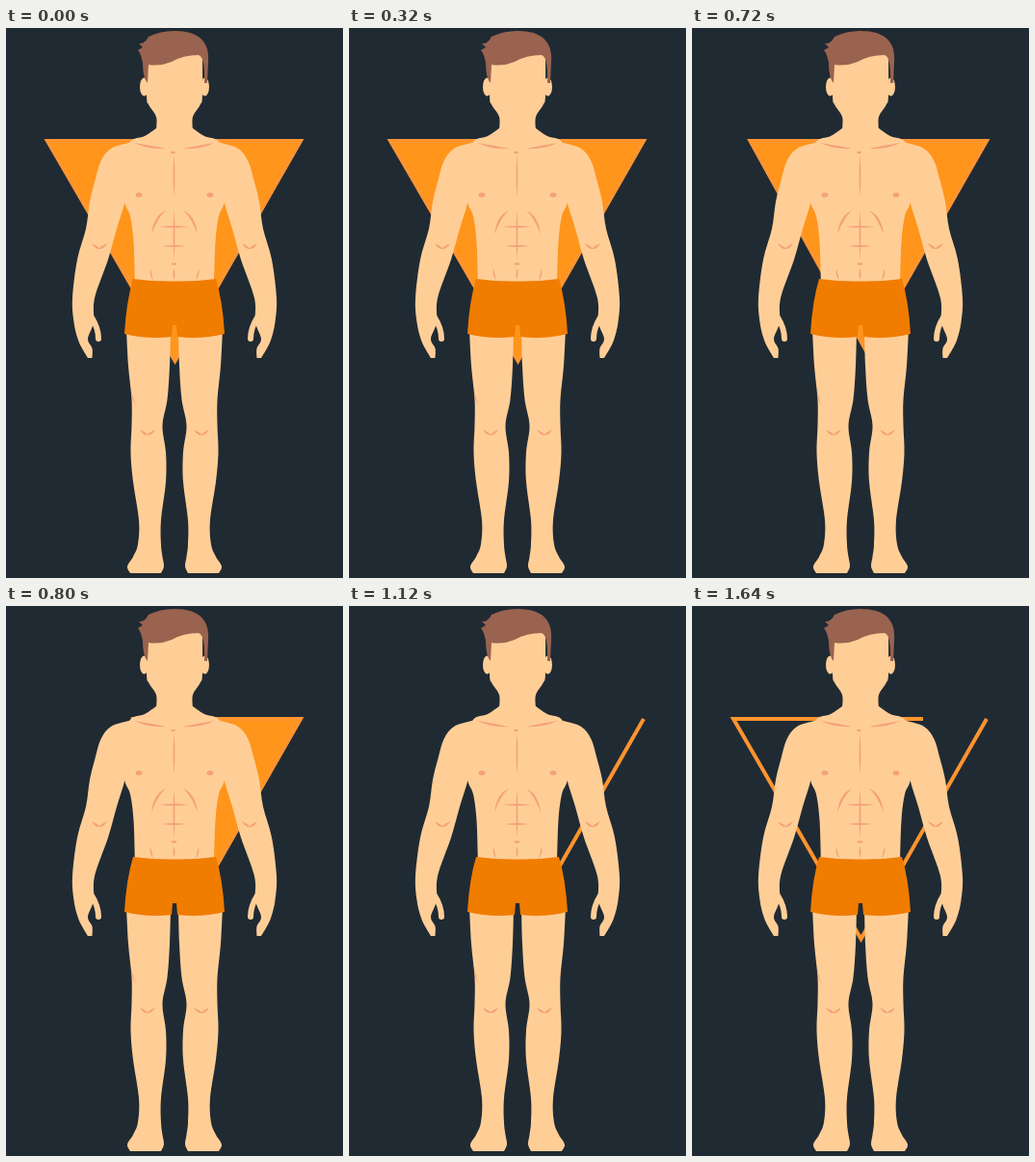
An HTML page with a canvas that plays this animation: 350x570 px, repeating every 1680 ms.

```html
<!DOCTYPE html>
<html lang="en">
<head>
<meta charset="utf-8">
<title>Body shape</title>
<style>
html, body { margin: 0; width: 100%; height: 100%; overflow: hidden; background: #202a33; }
canvas { display: block; width: 350px; height: 570px; }
</style>
</head>
<body>
<canvas id="stage" width="350" height="570"></canvas>
<script>
const ctx = document.getElementById('stage').getContext('2d');
const LOOP = 1680, STEP = 40;
const SHRINK_START = 600, SHRINK_TIME = 280;
const DRAW_START = 863, DRAW_SPEED = 0.931;
const MIDDLE = 175;
const COLORS = {
  back: '#202a33', skin: '#ffce97', crease: '#f4a277',
  hair: '#99634f', shorts: '#f07c00', fill: '#ff951a', line: '#ff942e'
};
const RIGHT = [306, 117], BOTTOM = [175.5, 345], LEFT = [43, 117];
const SHORTS = new Path2D('M176 262.5Q155 263 132 260Q125 283 123 317Q147 323 172 320L173 308H176Z');
const HAIR = new Path2D('M138 16Q144 17 148 9Q160 3 175 3C200 3 212 14 210 36L209 57H206' +
  'Q207 30 200 28Q184 28 172 35Q160 40 148 38L147 57Q142 52 142 36Q140 26 137 23L142 20Z');

const mix = (a, b, k) => a.map((v, i) => v + (b[i] - v) * k);
const distance = (a, b) => Math.hypot(b[0] - a[0], b[1] - a[1]);

function fillPath(path, color) {
  ctx.fillStyle = color;
  ctx.fill(path);
}

function curveThrough(points) {
  const at = i => points[Math.max(0, Math.min(points.length - 1, i))];
  ctx.lineTo(...points[0]);
  for (let i = 0; i < points.length - 1; i++) {
    const [a, b, c, d] = [at(i - 1), at(i), at(i + 1), at(i + 2)];
    ctx.bezierCurveTo(b[0] + (c[0] - a[0]) / 6, b[1] + (c[1] - a[1]) / 6,
      c[0] - (d[0] - b[0]) / 6, c[1] - (d[1] - b[1]) / 6, ...c);
  }
}

// Smooth vertical form: each row is [y, left edge, right edge].
function form(...rows) {
  ctx.beginPath();
  curveThrough(rows.map(([y, left]) => [left, y]));
  curveThrough(rows.map(([y, , right = MIDDLE + 1]) => [right, y]).reverse());
  ctx.fill();
}

function dot(x, y, rx, ry) {
  ctx.beginPath();
  ctx.ellipse(x, y, rx, ry, 0, 0, Math.PI * 2);
  ctx.fill();
}

// Thin mark, widest in the middle and pointed at both ends.
function crease(from, bend, to, width = 2.4) {
  const length = distance(from, to);
  const nx = (from[1] - to[1]) / length * width, ny = (to[0] - from[0]) / length * width;
  ctx.beginPath();
  ctx.moveTo(...from);
  ctx.quadraticCurveTo(bend[0] + nx, bend[1] + ny, ...to);
  ctx.quadraticCurveTo(bend[0] - nx, bend[1] - ny, ...from);
  ctx.fill();
}

const straight = (from, to) => crease(from, mix(from, to, 0.5), to, 1.9);

function joint(x, y) {
  crease([x - 8, y - 6], [x - 3, y - 1], [x + 1, y]);
  crease([x - 1, y], [x + 3, y - 1], [x + 8, y - 6]);
}

function drawHalf() {
  ctx.fillStyle = COLORS.skin;
  form([20, 146], [70, 146], [80, 148.5], [92, 156], [106, 156]);
  dot(143.5, 61, 4.5, 9.5);
  form([104, 156], [112, 144], [119, 128], [150, 120], [180, 123], [195, 129], [222, 132.5], [266, 134]);
  form([119, 127, 130], [125, 109, 130], [138, 98.5, 128], [158, 92.5, 126], [180, 87, 123.5],
    [208, 83, 115], [240, 74, 106], [280, 69, 92], [305, 70.5, 91], [322, 74.5, 85],
    [332, 79, 89.5], [342, 85, 89.5]);
  form([312, 125, 171], [350, 127, 170], [385, 130.5, 167.5], [412, 130.5, 162.5], [440, 129.5, 166],
    [470, 132, 166], [510, 138, 161], [535, 137, 161], [548, 132, 162.5], [558, 126, 164], [565, 129, 161]);

  ctx.strokeStyle = COLORS.skin;
  ctx.lineWidth = 6;
  ctx.lineCap = 'round';
  ctx.beginPath();
  ctx.moveTo(89, 300);
  ctx.quadraticCurveTo(96, 311, 96, 322);
  ctx.stroke();

  ctx.fillStyle = COLORS.crease;
  crease([133, 119], [150, 124], [166, 125]);
  dot(138, 173, 3.5, 2.5);
  crease([166, 189], [155, 196], [151, 214]);
  crease([150, 249], [150, 256], [153, 262], 1.6);
  joint(97, 229);
  joint(147, 422);
  fillPath(SHORTS, COLORS.shorts);
}

function drawMan() {
  drawHalf();
  ctx.save();
  ctx.transform(-1, 0, 0, 1, MIDDLE * 2, 0);
  drawHalf();
  ctx.restore();

  ctx.fillStyle = COLORS.crease;
  dot(173.5, 129, 2.3, 1.3);
  dot(174.5, 244.5, 3, 1.3);
  for (const [top, bottom] of [[131, 175], [189, 241], [249, 261]]) straight([174.5, top], [174.5, bottom]);
  for (const [y, reach] of [[206, 15], [226, 12.5]]) straight([174.5 - reach, y], [174.5 + reach, y]);
  crease([130, 374], [131, 385], [135, 392], 1);
  fillPath(HAIR, COLORS.hair);
}

function strokeLine() {
  ctx.strokeStyle = COLORS.line;
  ctx.lineWidth = 4;
  ctx.lineCap = 'butt';
  ctx.stroke();
}

// The triangle folds into its right corner, the bottom corner lagging a little.
function drawTriangle(progress) {
  ctx.beginPath();
  ctx.moveTo(...RIGHT);
  ctx.lineTo(...mix(BOTTOM, RIGHT, progress ** 3.7));
  ctx.lineTo(...mix(LEFT, RIGHT, progress ** 3.2));
  ctx.closePath();
  ctx.fillStyle = COLORS.fill;
  ctx.fill();
  strokeLine();
}

function drawOutline(length) {
  const corners = [RIGHT, BOTTOM, LEFT, RIGHT];
  ctx.beginPath();
  ctx.moveTo(...RIGHT);
  for (let i = 1; i < corners.length && length > 0; i++) {
    const side = distance(corners[i - 1], corners[i]);
    ctx.lineTo(...mix(corners[i - 1], corners[i], Math.min(1, length / side)));
    length -= side;
  }
  strokeLine();
}

function render(time) {
  ctx.fillStyle = COLORS.back;
  ctx.fillRect(0, 0, 350, 570);
  const progress = Math.max(0, (time - SHRINK_START) / SHRINK_TIME);
  if (progress < 1) drawTriangle(progress);
  if (time > DRAW_START) drawOutline((time - DRAW_START) * DRAW_SPEED);
  drawMan();
}

const start = performance.now();
function tick() {
  const time = (performance.now() - start) % LOOP;
  render(Math.floor(time / STEP) * STEP);
  requestAnimationFrame(tick);
}
tick();
</script>
</body>
</html>
```
